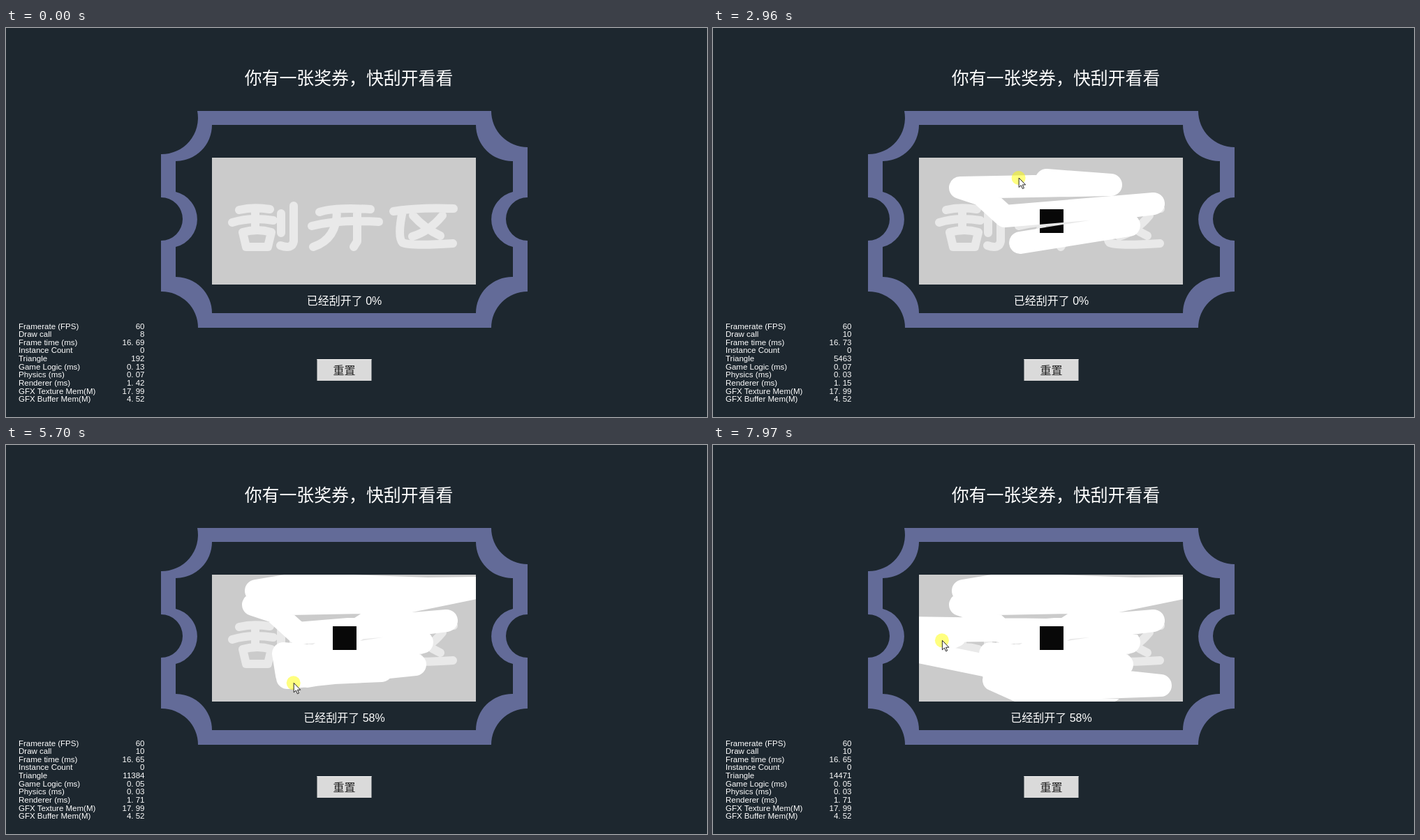
An HTML page that plays this animation: 1004x558 px, repeating every 8 s.

```html
<!DOCTYPE html>
<html lang="zh-CN">
<head>
<meta charset="utf-8">
<style>
  html, body { margin: 0; width: 100%; height: 100%; overflow: hidden; background: #1d272f; }
  svg { display: block; }
  text { fill: #fff; font-family: "Noto Sans CJK SC", "Noto Sans CJK", sans-serif; text-anchor: middle; }
  #percent { font-family: "Liberation Sans", "Noto Sans CJK SC", "Noto Sans CJK", sans-serif; }
  #stats text { font: 11.5px "Liberation Sans", Arial, sans-serif; text-anchor: start; }
  #stats .value { text-anchor: end; }
  .brush { fill: none; stroke-linecap: round; stroke-linejoin: round; }
</style>
</head>
<body>
<svg width="1004" height="558" viewBox="0 0 1004 558">
  <defs>
    <mask id="scratched" maskUnits="userSpaceOnUse" x="295" y="186" width="378" height="182">
      <!-- The whole mouse route: approach, then back and forth over the panel -->
      <path id="route" class="brush" stroke="#fff" stroke-width="32" d="
        M800 547L505 425L492 455L440 308
        L596 283L550 262L631 252L418 270L384 239L354 229
        L570 225L358 209L418 199L604 206L672 205
        L560 228L440 305L538 324L402 330L397 299
        L586 315L403 334L490 322L402 337
        L440 354L570 353L500 350L641 345L403 319L296 297
        L347 274L280 262L480 265L316 267L332 285"/>
    </mask>
  </defs>

  <text x="491" y="80.5" font-size="24.9" font-weight="300">你有一张奖券，快刮开看看</text>

  <path fill="#636b98" fill-rule="evenodd" d="
    M274 119H695A52 52 0 0 0 747 171V243A31 31 0 0 0 747 305V378A52 52 0 0 0 695 430
    H275A52 52 0 0 0 222 378V305A31 31 0 0 0 222 243V181A52 52 0 0 0 274 119Z
    M295 139H673A52 52 0 0 0 726 191V235A40.7 40.7 0 0 0 726 314V357A52 52 0 0 0 673 409
    H295A52 52 0 0 0 243 357V314A40.7 40.7 0 0 0 243 235V191A52 52 0 0 0 295 139Z"/>

  <rect x="295" y="186" width="378" height="182" fill="#cbcbcb"/>
  <g class="brush" stroke="#e9e9e9" stroke-width="12" role="img" aria-label="刮开区">
    <path d="M334 261Q354 256 378 260M324 279Q350 271 383 276M357 262V290
      M339 293L344 314H375L380 293Q360 287 339 293M394 266V294M412 255V306Q410 318 393 312"/>
    <path d="M449 264Q470 257 522 260M438 284Q480 274 534 278M474 262Q474 303 440 314M503 261V306L498 314"/>
    <path d="M555 263Q590 257 641 259M568 263Q560 300 568 308Q580 313 640 309M625 269Q606 292 582 299M583 269Q600 288 622 298"/>
  </g>

  <g mask="url(#scratched)">
    <rect x="295" y="186" width="378" height="182" fill="#fff"/>
    <rect x="468" y="260" width="34" height="34" fill="#080808"/>
  </g>

  <text id="percent" x="484.5" y="396.5" font-size="16"></text>
  <rect x="445.5" y="475" width="78" height="31" fill="#dadada"/>
  <path d="M445.5 475.5H523.5" stroke="#f2f2f2"/>
  <text x="484.5" y="496.5" font-size="16" style="fill:#222">重置</text>
  <g id="stats"></g>

  <g id="cursor">
    <circle r="10" fill="#ff0" fill-opacity=".5"/>
    <path d="M.5 0V13.5L3.6 10.7L5.7 15.5L7.8 14.6L5.7 9.9H10Z" fill="#fff" stroke="#111" stroke-width=".9"/>
  </g>
</svg>

<script>
const LOOP = 8000, STEP = 78;        // ms; the picture advances in steps
const APPEAR = 4, RELEASE = 68;      // steps: mouse enters, result is counted
const SPEED = 42.3, LAG = 40;        // mouse px per step; scratch trails the mouse
const APPROACH = 508;                // px travelled before scratching starts
const TICK = 500;                    // ms between profiler updates

const $ = id => document.getElementById(id);
const route = $("route"), routeLength = route.getTotalLength();

const labels = ["Framerate (FPS)", "Draw call", "Frame time (ms)", "Instance Count", "Triangle",
  "Game Logic (ms)", "Physics (ms)", "Renderer (ms)", "GFX Texture Mem(M)", "GFX Buffer Mem(M)"];

function addText(x, y, content, cls) {
  const el = document.createElementNS("http://www.w3.org/2000/svg", "text");
  el.setAttribute("x", x);
  el.setAttribute("y", y);
  el.setAttribute("class", cls);
  el.textContent = content;
  return $("stats").appendChild(el);
}

const values = labels.map((label, i) => {
  const y = 431.5 + i * 11.65;
  addText(18, y, label, "label");
  return addText(198.5, y, "", "value");
});

const stepAt = t => Math.floor((t + 20) / STEP);
const travelled = step => Math.min(routeLength, Math.max(0, step - APPEAR) * SPEED);
const scratchedLength = step => Math.max(0, travelled(step) - APPROACH - LAG);

function drawStats(t) {
  const tick = Math.floor((t + 430) / TICK);
  const progress = scratchedLength(stepAt(tick * TICK - 430)) / (routeLength - APPROACH - LAG);
  const wobble = Math.sin(tick * tick * 2.3);
  const readings = [
    60,
    progress > 0 ? 10 : 8,
    16.69 + .04 * wobble,
    0,
    192 + Math.round(14841 * progress ** .62),
    .05 + .08 * Math.exp(-tick / 4),
    .03 + .04 * Math.exp(-tick),
    1.42 - .3 * wobble,
    17.99,
    4.52
  ];
  readings.forEach((v, i) => {
    values[i].textContent = String(Math.round(v * 100) / 100).replace(".", ". ");
  });
}

function render(now) {
  const t = now % LOOP, step = stepAt(t);
  const mouse = route.getPointAtLength(travelled(step));
  const scratch = scratchedLength(step);

  drawStats(t);
  route.style.display = scratch > 0 ? "" : "none";
  route.setAttribute("stroke-dasharray", `0 ${APPROACH} ${scratch} 9999`);
  $("percent").textContent = `已经刮开了 ${step < RELEASE ? 0 : 58}%`;
  $("cursor").setAttribute("transform", `translate(${mouse.x} ${mouse.y})`);
  $("cursor").style.display = step < APPEAR ? "none" : "";
}

const start = performance.now();
(function loop() {
  render(performance.now() - start);
  requestAnimationFrame(loop);
})();
</script>
</body>
</html>
```
